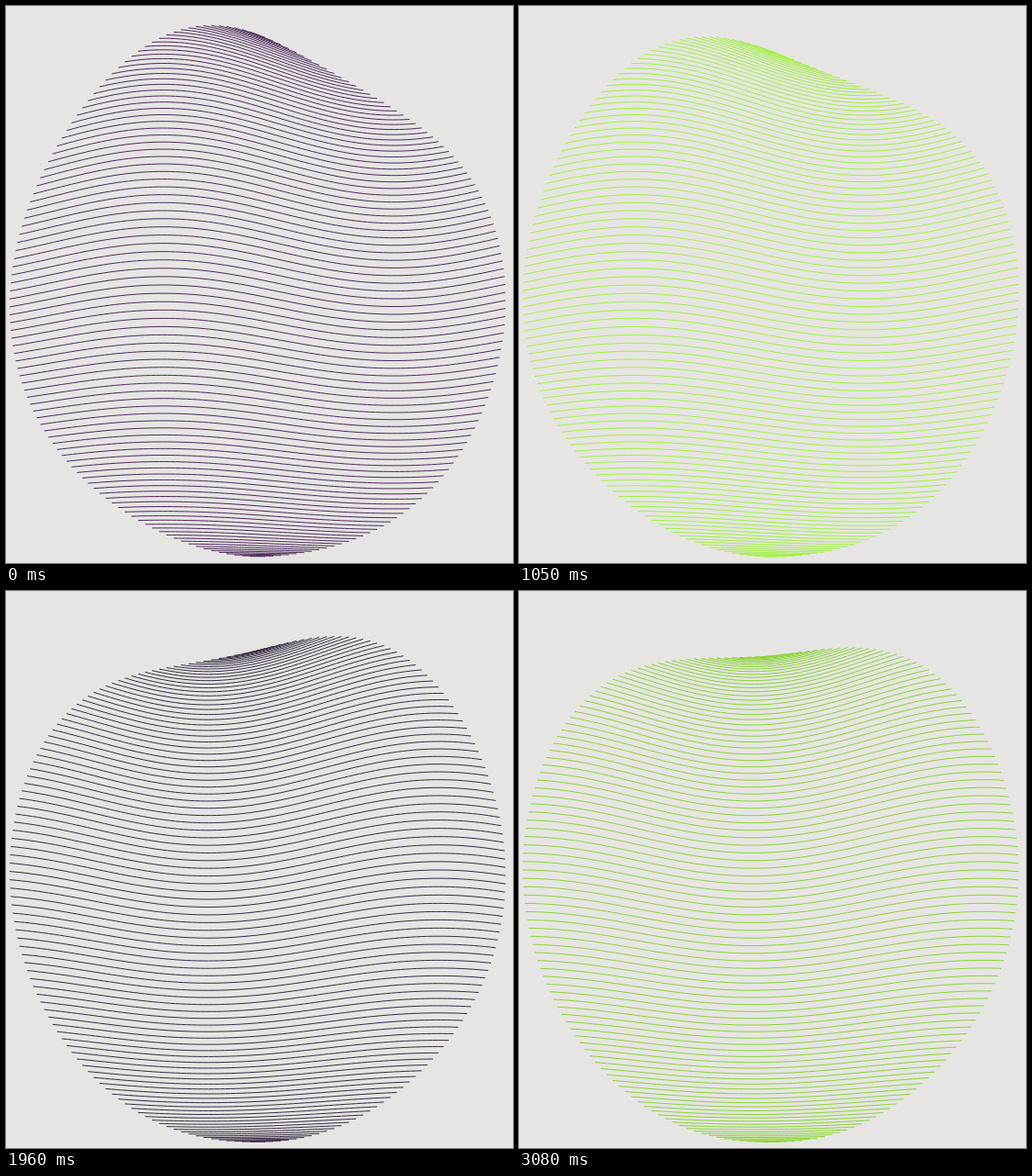
Animation of 552x607 px, one loop 3150 ms. Source, as an HTML page with a canvas:

```html
<!DOCTYPE html>
<html lang="en">
<head>
<meta charset="utf-8">
<title>Rippling egg</title>
<style>
  html, body { margin: 0; width: 552px; height: 607px; overflow: hidden; background: #e6e5e3; }
  canvas { display: block; }
</style>
</head>
<body>
<canvas id="stage" width="552" height="607"></canvas>
<script>
const ctx = document.getElementById('stage').getContext('2d');
const STEP = 70, STEPS = 45, LINES = 100;
const CX = 274, CY = 320, RX = 270, RY = 280;
const SWELL = 32, WAVE = 80, CREST = 171;

// step, wave ticks, line colour
const keys = [
  [0, 0, 75, 40, 90],
  [9, 35, 255, 112, 36],
  [15, 60, 160, 242, 58],
  [21, 84, 27, 118, 34],
  [28, 113, 54, 40, 66],
  [38, 153, 248, 48, 238],
  [44, 178, 138, 212, 50]
];

function stateAt(step) {
  const i = Math.max(1, keys.findIndex(k => k[0] >= step));
  const a = keys[i - 1], b = keys[i];
  const u = (step - a[0]) / (b[0] - a[0]);
  return a.map((v, j) => Math.round(v + (b[j] - v) * u));
}

function draw(step) {
  const [, tick, ...rgb] = stateAt(step);
  ctx.fillStyle = '#e6e5e3';
  ctx.fillRect(0, 0, 552, 607);
  ctx.strokeStyle = `rgb(${rgb})`;
  ctx.lineWidth = 1;
  for (let i = 0; i <= LINES; i++) {
    const angle = Math.PI * i / LINES;
    const half = RX * Math.sin(angle);
    const y = CY - RY * Math.cos(angle);
    const swell = SWELL * (1 - i / LINES);
    const count = Math.max(1, Math.ceil(half / 3));
    ctx.beginPath();
    for (let j = 0; j <= count; j++) {
      const x = CX - half + 2 * half * j / count;
      ctx.lineTo(x, y - swell * Math.cos((x - CREST) / WAVE - tick * 0.2));
    }
    ctx.stroke();
  }
}

const start = performance.now();
let shown = -1;
function loop() {
  const step = Math.floor((performance.now() - start) / STEP) % STEPS;
  if (step !== shown) draw(shown = step);
  requestAnimationFrame(loop);
}
loop();
</script>
</body>
</html>
```
